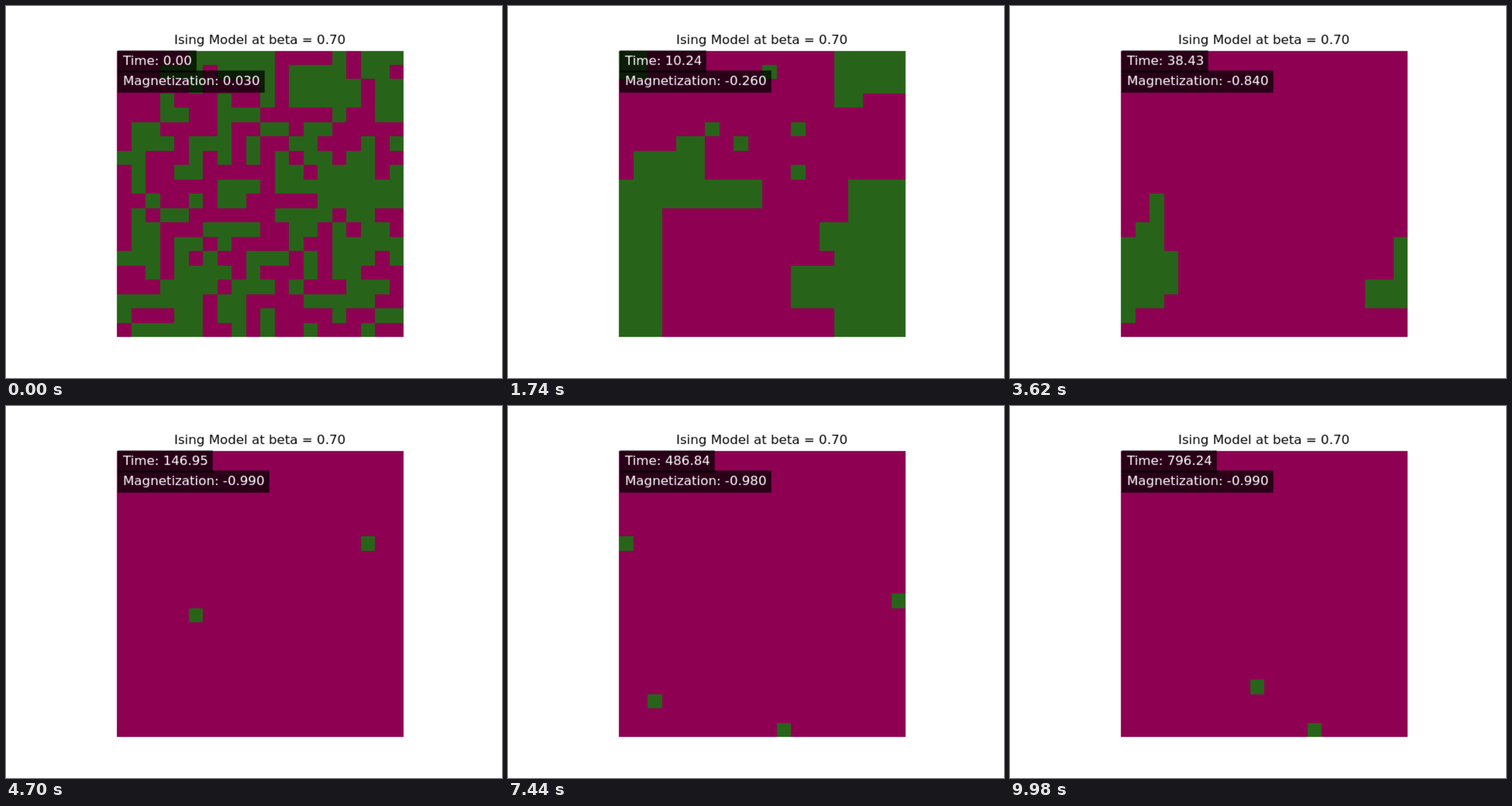
Animation, 864 px wide and 648 px high, one loop 10000 ms. Source, as an HTML page with a canvas:

```html
<!DOCTYPE html>
<html lang="en">
<head>
<meta charset="utf-8">
<title>Ising Model</title>
<style>
  html, body { margin: 0; width: 864px; height: 648px; overflow: hidden; background: #fff; }
  canvas { display: block; width: 864px; height: 648px; }
</style>
</head>
<body>
<canvas id="plot" width="640" height="480"></canvas>
<script>
const N = 20, SITES = N * N, CELL = 18.5, LEFT = 143, TOP = 57, AXES_TOP = 58;
const STEP = 20, FLIPS = 10, BETA = 0.7;
const DOWN = '#8e0152', UP = '#276419';

// Known states: the main blocks of up spins as [x, y, w, h], topped up at random to "count".
// "pull" is the drift towards the next state, at the start and end of the stretch.
const keys = [
  { at: 0, time: 0, count: 206, pull: [0.1, 0.9], up: [
    [12, 2, 5, 2], [15, 0, 1, 5], [18, 0, 1, 5], [15, 9, 4, 2],
    [16, 8, 2, 4], [4, 15, 2, 5], [13, 17, 5, 1], [1, 19, 5, 1]] },
  { at: 87, time: 10.24, count: 148, pull: [0, 0.7], up: [
    [0, 0, 2, 2], [15, 0, 5, 3], [15, 3, 2, 1], [4, 6, 2, 1], [1, 7, 5, 2], [0, 9, 10, 2],
    [0, 11, 3, 9], [16, 9, 4, 3], [14, 12, 6, 2], [15, 14, 5, 6], [12, 15, 3, 3]] },
  { at: 181, time: 38.43, count: 32, pull: [0.6, 0], up: [
    [2, 10, 1, 2], [1, 12, 2, 6], [0, 13, 1, 6], [3, 14, 1, 3], [19, 13, 1, 3], [17, 16, 3, 2]] },
  { at: 235, time: 146.95, count: 2, pull: [0, 0], up: [[17, 6], [5, 11]] },
  { at: 319, time: 355.91, count: 2, pull: [0, 0], up: [[14, 10], [7, 16]] },
  { at: 424, time: 617.78, count: 2, pull: [0, 0], up: [[13, 5], [11, 11]] },
  { at: 499, time: 796.24, count: 2, up: [[9, 16], [13, 19]] }
];

function seeded(a) {
  return () => {
    a = a + 0x6D2B79F5 | 0;
    let t = Math.imul(a ^ a >>> 15, 1 | a);
    t = t + Math.imul(t ^ t >>> 7, 61 | t) ^ t;
    return ((t ^ t >>> 14) >>> 0) / 4294967296;
  };
}
const random = seeded(70);

const wrap = v => (v + N) % N;
const spin = (cells, x, y) => cells[wrap(y) * N + wrap(x)];
const countUp = cells => cells.filter(s => s > 0).length;

function build({ up, count }) {
  const cells = new Int8Array(SITES).fill(-1);
  for (const [x, y, w = 1, h = 1] of up)
    for (let row = y; row < y + h; row++) cells.fill(1, row * N + x, row * N + x + w);
  while (countUp(cells) < count) cells[Math.floor(random() * SITES)] = 1;
  return cells;
}

// One rejection-free Metropolis flip; returns the waiting time.
const weights = new Float64Array(SITES);
function flip(cells, target, pull) {
  let rates = 0, total = 0;
  for (let i = 0; i < SITES; i++) {
    const x = i % N, y = (i - x) / N;
    const around = spin(cells, x - 1, y) + spin(cells, x + 1, y) +
                   spin(cells, x, y - 1) + spin(cells, x, y + 1);
    const rate = Math.min(1, Math.exp(-2 * BETA * cells[i] * around));
    rates += rate;
    total += weights[i] = rate * Math.exp(cells[i] === target[i] ? -pull : pull);
  }
  let pick = random() * total, i = 0;
  while (i < SITES - 1 && (pick -= weights[i]) > 0) i++;
  cells[i] *= -1;
  return -Math.log(1 - random()) / rates;
}

// Runs the model from one known state to the next and fits its clock to the known times.
function runStretch(key, next, cells, target) {
  const length = next.at - key.at, [from, to] = key.pull, steps = [];
  let clock = 0;
  for (let f = 0; f < length; f++) {
    steps.push({ cells: cells.slice(), clock });
    const pull = from + (to - from) * f / length;
    for (let n = 0; n < FLIPS; n++) clock += flip(cells, target, pull);
  }
  const scale = (next.time - key.time) / clock;
  return steps.map(s => ({ cells: s.cells, time: key.time + s.clock * scale }));
}

function simulate() {
  const states = keys.map(build), end = keys.length - 1, frames = [];
  for (let k = 0; k < end; k++)
    frames.push(...runStretch(keys[k], keys[k + 1], states[k], states[k + 1]));
  frames.push({ cells: states[end], time: keys[end].time });
  return frames;
}

const ctx = document.getElementById('plot').getContext('2d');
ctx.font = '16.667px "DejaVu Sans", sans-serif';
ctx.lineWidth = 1.39;

const edge = (start, k) => Math.round(start + k * CELL);

function drawGrid(cells) {
  cells.forEach((s, i) => {
    const x = i % N, y = (i - x) / N, px = edge(LEFT, x), py = edge(TOP, y);
    ctx.fillStyle = s > 0 ? UP : DOWN;
    ctx.fillRect(px, py, edge(LEFT, x + 1) - px, edge(TOP, y + 1) - py);
  });
  ctx.clearRect(0, 0, 640, AXES_TOP);
}

function drawText(text, x, y, color) {
  ctx.fillStyle = color;
  ctx.fillText(text, x, y);
}

function drawLabel(text, y) {
  const x = 151, pad = 6, width = Math.round(ctx.measureText(text).width) + 2 * pad - 1;
  const box = [x - pad, y - 18, width, 27];
  ctx.fillStyle = ctx.strokeStyle = 'rgba(0, 0, 0, .7)';
  ctx.fillRect(...box);
  ctx.strokeRect(...box);
  drawText(text, x, y, '#fff');
}

const frames = simulate();
let shown = -1;
function show(index) {
  if (index === shown) return;
  shown = index;
  const { cells, time } = frames[index];
  const mag = 2 * countUp(cells) / SITES - 1;
  ctx.clearRect(0, 0, 640, 480);
  drawGrid(cells);
  drawText('Ising Model at beta = 0.70', 217, 49, '#000');
  drawLabel('Time: ' + time.toFixed(2), 76);
  drawLabel('Magnetization: ' + mag.toFixed(3), 102);
}

const start = performance.now();
function tick() {
  show(Math.floor((performance.now() - start) / STEP) % frames.length);
  requestAnimationFrame(tick);
}
tick();
</script>
</body>
</html>
```
